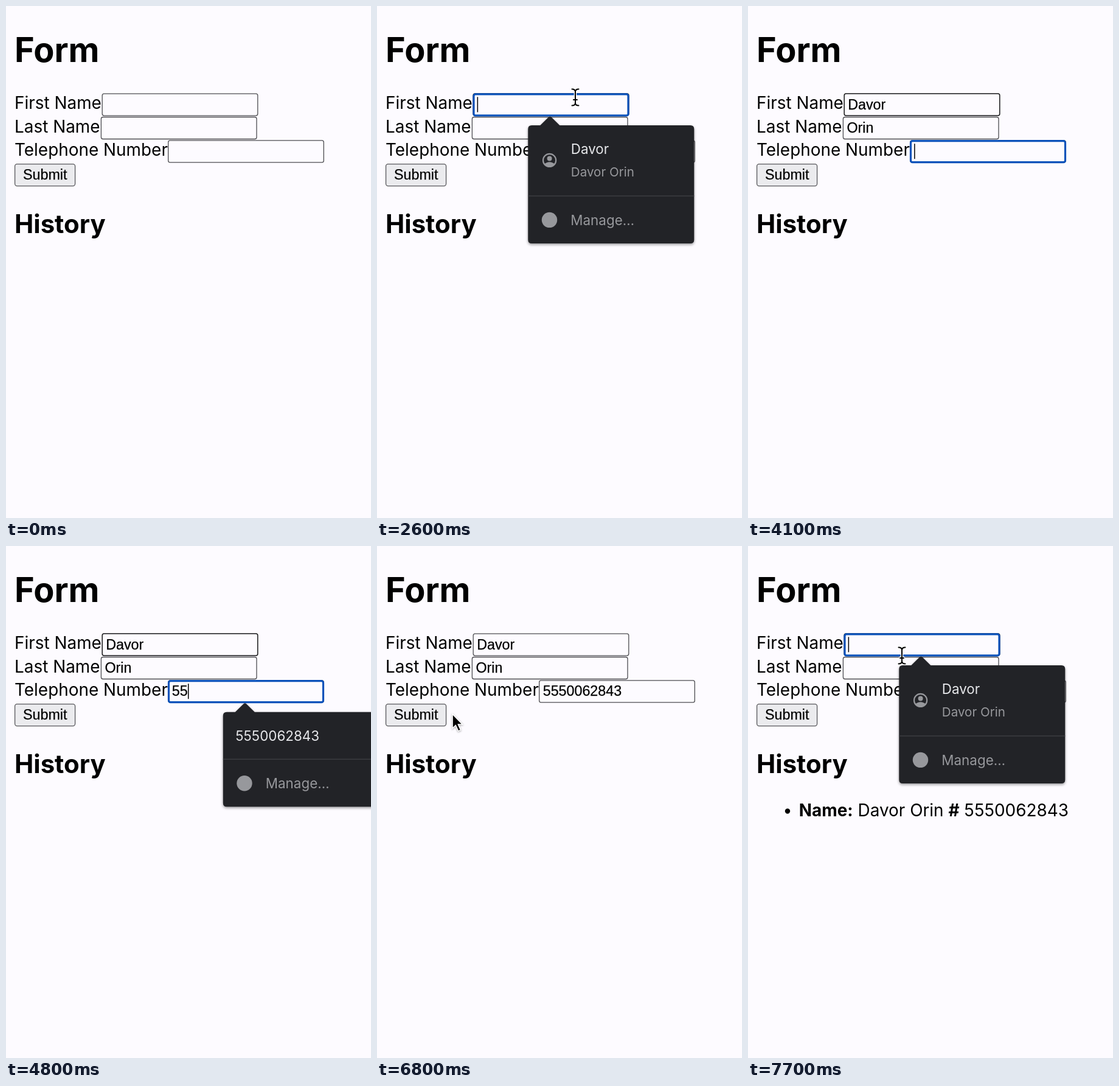
Animation, 600 px wide and 841 px high, one loop 8000 ms. Source, as an HTML page:

```html
<!DOCTYPE html>
<html lang="en">
<head>
<meta charset="utf-8">
<title>Form</title>
<style>
  html, body { margin: 0; width: 100%; height: 100%; overflow: hidden; background: #fdfbff; }
  svg { display: block; width: 600px; height: 841px; }
  text { font: 27.92px Inter, sans-serif; font-optical-sizing: none; fill: #000; white-space: pre; }
  .h1 { font-size: 55.84px; font-weight: 700; }
  .h2 { font-size: 41.88px; font-weight: 700; }
  .b { font-weight: 700; }
  .ui { font: 23.27px "Liberation Sans", Arial, sans-serif; stroke: #000; stroke-width: .25; }
  .box { fill: #fdfbff; stroke: #4c4c50; stroke-width: 1.3; }
  .box.hover { stroke: #151517; stroke-width: 1.5; }
  .ring { fill: none; stroke: #0b52ba; stroke-width: 3.2; }
  .btn { fill: #ebebee; stroke: #58585c; stroke-width: 1.3; }
  .btn.hover { fill: #e1e1e4; stroke: #3c3c40; }
  .btn.down { fill: #f4f4f7; stroke: #8c8c90; }
  #popup { filter: drop-shadow(0 2px 2px rgba(0, 0, 0, .4)); }
  #popup text { font-size: 22.4px; fill: #e6e7ea; }
  #popup .dim { fill: #97989c; }
  #popup .sub { font-size: 20.6px; }
</style>
</head>
<body>
<svg viewBox="0 0 600 841">
  <text class="h1" x="14" y="91.5">Form</text>
  <g id="form"></g>
  <rect id="btn" class="btn" x="14.6" y="259.6" width="99" height="36" rx="3.5"/>
  <text class="ui" x="28" y="285">Submit</text>
  <text class="h2" x="14" y="372.5">History</text>
  <g id="entry">
    <circle cx="65" cy="435.5" r="4.2"/>
    <text x="83.8" y="444"><tspan class="b">Name:</tspan><tspan id="who"></tspan><tspan class="b">#</tspan><tspan id="tel"></tspan></text>
  </g>
  <g id="focus">
    <rect class="ring" x=".8" y=".8" width="254" height="35" rx="3"/>
    <rect id="caret" y="5.3" width="1.5" height="25"/>
  </g>
  <g id="popup">
    <path id="panel" fill="#222327"/>
    <text id="title" y="47.2"></text>
    <g id="person" transform="translate(35.3 57.5)">
      <circle r="10.6" fill="none" stroke="#97989c" stroke-width="2.2"/>
      <circle cy="-3" r="4" fill="#97989c"/>
      <path d="M-8 6.5C-5 1.5 5 1.5 8 6.5Q0 14 -8 6.5Z" fill="#97989c"/>
    </g>
    <text id="sub" class="dim sub" x="70.5" y="84"></text>
    <g id="foot">
      <path d="M0 116H273" stroke="#3b3c40" stroke-width="1.5"/>
      <circle cx="35.2" cy="155.5" r="12.7" fill="#97989c"/>
      <text class="dim" x="70" y="164">Manage…</text>
    </g>
  </g>
  <defs>
    <path id="stem" fill="none" stroke-linecap="round"
      d="M-5.5-13.5Q0-13.5 0-9V9Q0 13.5-5.5 13.5M5.5-13.5Q0-13.5 0-9M5.5 13.5Q0 13.5 0 9M-3 4H3"/>
  </defs>
  <g id="beam">
    <use href="#stem" stroke="#fff" stroke-width="4.4"/>
    <use href="#stem" stroke="#000" stroke-width="2"/>
  </g>
  <path id="arrow" d="M0 0V23.5L5.3 18.5L9.6 28L13.6 26.2L9.4 17H16.5Z" fill="#000" stroke="#fff"
    stroke-width="1.6" style="filter:drop-shadow(0 1.5px 1.5px rgba(0,0,0,.35))"/>
</svg>
<script>
const LOOP = 8000, TICK = 100, PRESS = 7000, SUBMIT = 7100;
const W = 255.6, H = 36;
const $ = id => document.getElementById(id);
const show = (id, on) => { $(id).style.display = on ? '' : 'none'; };
const move = (id, x, y) => $(id).setAttribute('transform', `translate(${x} ${y})`);
const clamp = v => Math.min(1, Math.max(0, v));

function add(tag, attrs, content = '') {
  const el = document.createElementNS('http://www.w3.org/2000/svg', tag);
  for (const k in attrs) el.setAttribute(k, attrs[k]);
  el.textContent = content;
  return $('form').appendChild(el);
}

const first = 'Davor', last = 'Orin', phone = '5550062843', full = `${first} ${last}`;
const fields = [
  { label: 'First Name', value: first, x: 158.2, typeAt: 2700, pace: 100 },
  { label: 'Last Name', value: last, x: 156.4, typeAt: 3500, pace: 100 },
  { label: 'Telephone Number', value: phone, x: 266.7, typeAt: 4500, pace: 155 }
];
fields.forEach((f, i) => {
  f.y = 144.1 + 38.4 * i;
  add('text', { x: 14, y: f.y + 25 }, f.label);
  f.box = add('rect', { x: f.x, y: f.y, width: W, height: H, rx: 3 });
  f.text = add('text', { class: 'ui', x: f.x + 6, y: f.y + 25.4 });
});
$('who').textContent = ` ${full} `;
$('tel').textContent = ` ${phone}`;

// focus lasts from on to off; the suggestions open at list
const [a, b, c] = fields;
const visits = [
  { field: a, on: 2100, list: 2200, off: 3200 },
  { field: b, on: 3200, list: b.typeAt, off: 4000 },
  { field: c, on: 4000, list: c.typeAt, off: 6500 },
  { field: a, on: 7500, list: 7600, off: LOOP }
];

// pointer moves: start, end, x, y
const moves = [
  [500, 800, 120, 80], [800, 1000, 36, 218], [1200, 1400, 366, 136], [1400, 1500, 60, 172],
  [1700, 1800, 341, 146], [1800, 2600, 326, 150], [6100, 6500, 214, 302],
  [6500, 6800, 124, 276], [6800, PRESS, 82, 275], [SUBMIT, 7500, 253, 180]
];
const pointer = t => moves.reduce(([px, py], [from, to, x, y]) => {
  const k = clamp((t - from) / (to - from));
  return [px + (x - px) * k, py + (y - py) * k];
}, [455, 338]);

function drawFocus(t) {
  const v = visits.find(v => v.on <= t && t < v.off);
  show('focus', v);
  if (!v) return;
  const { x, y, text } = v.field;
  move('focus', x, y);
  $('caret').setAttribute('x', 6.4 + (text.textContent ? text.getComputedTextLength() : 0));
}

function drawPopup(t) {
  const v = visits.filter(v => v.list <= t).pop();
  const alpha = !v ? 0 : t < v.off ? clamp(.5 + (t - v.list) / 200) : clamp(.5 - (t - v.off) / 200);
  show('popup', alpha);
  if (!alpha) return;
  const f = v.field, person = f !== c, h = person ? 194 : 155.5;
  move('popup', f.x + 90.1, f.y + 51.8);
  $('popup').setAttribute('opacity', alpha);
  $('panel').setAttribute('d', `M6 0H20L33.5-13.2Q36-15.6 38.5-13.2L52 0H267Q273 0 273 6V${h - 6}` +
    `Q273 ${h} 267 ${h}H6Q0 ${h} 0 ${h - 6}V6Q0 0 6 0Z`);
  $('title').setAttribute('x', person ? 70.5 : 20.5);
  $('title').textContent = f.value;
  $('sub').textContent = person ? full : '';
  show('person', person);
  move('foot', 0, h - 194);
}

function drawPointer(t) {
  const [x, y] = pointer(t);
  const inRow = f => y >= f.y && y <= f.y + H && x > 14 && x < f.x + W;
  for (const f of fields) {
    f.box.setAttribute('class', 'box' + (t >= 500 && inRow(f) && x > f.x ? ' hover' : ''));
  }
  const onBtn = x > 14 && x < 114 && y > 259 && y < 296;
  const pressed = t >= PRESS && t < SUBMIT;
  $('btn').setAttribute('class', 'btn' + (pressed ? ' down' : onBtn ? ' hover' : ''));

  // hidden at first and while typing
  const visible = t >= 500 && (t < a.typeAt || t >= 6100);
  const kind = fields.some(inRow) ? 'beam' : 'arrow';
  for (const id of ['beam', 'arrow']) {
    show(id, visible && id === kind);
    move(id, x, y);
  }
}

function draw(t) {
  for (const f of fields) {
    const n = t < f.typeAt || t >= SUBMIT ? 0 : 1 + Math.floor((t - f.typeAt) / f.pace);
    f.text.textContent = f.value.slice(0, n);
  }
  show('entry', t >= SUBMIT);
  drawFocus(t);
  drawPopup(t);
  drawPointer(t);
}

const start = performance.now();
let shown = -1;
function frame() {
  const t = Math.floor((performance.now() - start) % LOOP / TICK) * TICK;
  if (t !== shown) draw(shown = t);
  requestAnimationFrame(frame);
}
frame();
</script>
</body>
</html>
```
